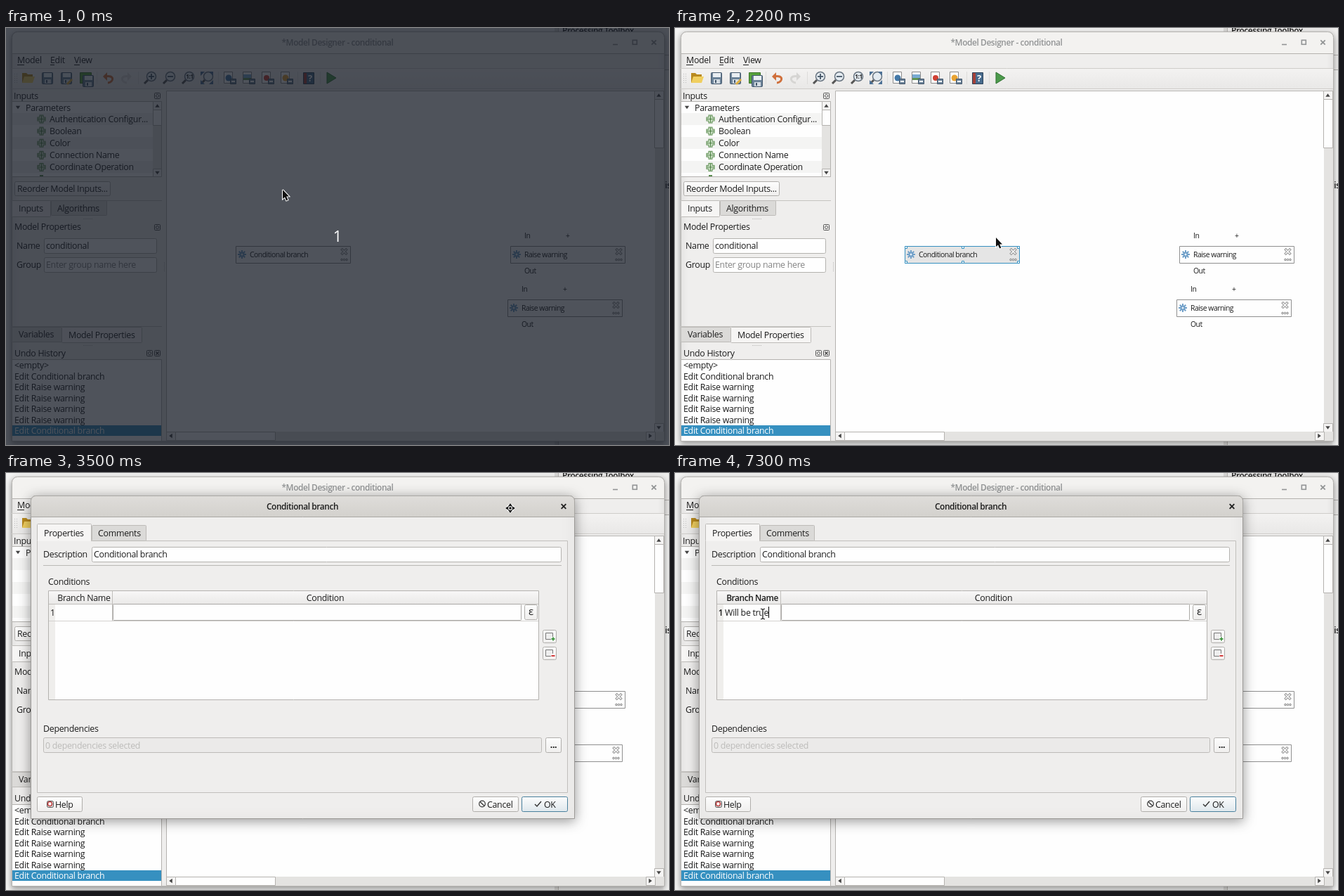
Recreate the animation shown at these times as an HTML page with a canvas. Size 944x593 px, loop 8 s.

```html
<!DOCTYPE html>
<html lang="en">
<head>
<meta charset="utf-8">
<title>Model Designer</title>
<style>
html, body { margin: 0; width: 100%; height: 100%; overflow: hidden; }
canvas { display: block; }
</style>
</head>
<body>
<canvas id="stage" width="944" height="593"></canvas>
<script>
const c = document.getElementById('stage').getContext('2d');
const LOOP = 8000, STEP = 100;
const INK = '#1c1c1c', PANEL = '#efeeed', WHITE = '#fefefe', EDGE = '#b4b2af', BLUE = '#3690c0';

// Each key is [time, x, y].
const pointerPath = [[600, 394, 230], [1300, 477, 329], [1400, 481, 330], [2100, 481, 330],
  [2600, 247, 21], [2700, 247, 21], [2900, 263, 23], [3100, 553, 42], [3300, 690, 49],
  [3500, 718, 50], [3700, 718, 50], [4400, 124, 198]];
const dialogPath = [[2700, -470, -28], [2900, -454, -27], [3100, -141, -12], [3200, -50, -5],
  [3300, -12, -1], [3500, 1, 0], [3700, 1, 0], [3800, 0, 0]];
const typing = [[5700, 'W'], [6200, 'Wi'], [6300, 'Wil'], [6400, 'Will'], [6500, 'Will b'], [6600, 'Will be'],
  [6700, 'Will be '], [7000, 'Will be t'], [7100, 'Will be tru'], [7300, 'Will be true']];

function along(path, t) {
  const i = path.findIndex(k => k[0] > t);
  if (i === 0) return path[0].slice(1);
  if (i < 0) return path[path.length - 1].slice(1);
  const [t0, x0, y0] = path[i - 1], [t1, x1, y1] = path[i];
  const u = (t - t0) / (t1 - t0), e = u * u * (3 - 2 * u);
  return [Math.round(x0 + (x1 - x0) * e), Math.round(y0 + (y1 - y0) * e)];
}

function rect(x, y, w, h, fill) { c.fillStyle = fill; c.fillRect(x, y, w, h); }

function box(x, y, w, h, fill = WHITE, stroke = EDGE, r = 0) {
  c.beginPath();
  c.roundRect(x + .5, y + .5, w, h, r);
  c.fillStyle = fill; c.fill();
  c.strokeStyle = stroke; c.lineWidth = 1; c.stroke();
}

function line(color, width, ...p) {
  c.beginPath();
  for (let i = 0; i < p.length; i += 2) c.lineTo(p[i], p[i + 1]);
  c.strokeStyle = color; c.lineWidth = width; c.stroke();
}

function poly(fill, ...p) {
  c.beginPath();
  for (let i = 0; i < p.length; i += 2) c.lineTo(p[i], p[i + 1]);
  c.fillStyle = fill; c.fill();
}

function disc(x, y, r, fill, stroke, width = 1) {
  c.beginPath(); c.arc(x, y, r, 0, 7);
  if (fill) { c.fillStyle = fill; c.fill(); }
  if (stroke) { c.strokeStyle = stroke; c.lineWidth = width; c.stroke(); }
}

function text(s, x, y, { color = INK, size = 12.4, weight = 400, align = 'left', gap = -.3 } = {}) {
  c.font = `${weight} ${size}px "Open Sans", "Noto Sans", sans-serif`;
  c.letterSpacing = gap + 'px';
  c.textAlign = align;
  c.fillStyle = color;
  c.fillText(s, x, y);
}

const bold = (s, x, y, color = INK) =>
  text(s, x, y, { color, size: 11.9, weight: 600, align: 'center', gap: -.4 });
const small = (s, x, y) => text(s, x, y, { size: 10.4, gap: -.5 });

function gradient(y, h, top, bottom) {
  const g = c.createLinearGradient(0, y, 0, y + h);
  g.addColorStop(0, top); g.addColorStop(1, bottom);
  return g;
}

const button = (x, y, w, h, stroke = '#b0aeab', bottom = '#f0efee') =>
  box(x, y, w, h, gradient(y, h, '#fdfdfd', bottom), stroke, 2);

function shadowed(draw, blur) {
  c.save();
  c.shadowColor = 'rgba(0,0,0,.4)'; c.shadowBlur = blur; c.shadowOffsetY = 3;
  draw();
  c.restore();
}

function arrowHead(x, y, dx, dy, size = 3.2, color = '#444') {
  poly(color, x + dx * size * .7, y + dy * size * .7, x - dx * size * .7 + dy * size, y - dy * size * .7 + dx * size,
    x - dx * size * .7 - dy * size, y - dy * size * .7 - dx * size);
}

function cross(x, y, r, color, width = 1.6) {
  line(color, width, x - r, y - r, x + r, y + r);
  line(color, width, x - r, y + r, x + r, y - r);
}

function grip(x, y, vertical) {
  for (let i = -3; i < 4; i++) rect(x + (vertical ? 0 : i * 2), y + (vertical ? i * 2 : 0), 1, 1, '#b9b8b6');
}

function dockIcon(x, y, close) {
  box(x - 4, y - 4, 8, 8, PANEL, '#555', 1);
  if (close) cross(x + .5, y + .5, 2.2, '#444', 1.3);
  else { disc(x + .5, y + .5, 2, null, '#555'); }
}

function plusIcon(x, y) {
  rect(x - 2.5, y - 6, 6, 12, '#5a8b4f'); rect(x - 5.5, y - 3, 12, 6, '#5a8b4f');
  rect(x - 1.5, y - 5, 4, 10, '#d5e8cf'); rect(x - 4.5, y - 2, 10, 4, '#d5e8cf');
  line('#477a3d', 1, x + .5, y - 5, x + .5, y + 5);
  line('#477a3d', 1, x - 5, y, x + 6, y);
}

function gear(x, y) {
  for (let i = 0; i < 4; i++) {
    const a = i * Math.PI / 4, dx = 6 * Math.cos(a), dy = 6 * Math.sin(a);
    line('#6f9fc8', 2, x - dx, y - dy, x + dx, y + dy);
  }
  disc(x, y, 3.6, '#6f9fc8');
  disc(x, y, 1.5, '#e8f0f8');
}

function magnifier(x, y) {
  line('#555', 3, x - 3, y + 3, x - 8, y + 8);
  disc(x + 2, y - 2, 6.5, '#e4ebf1', '#687480', 1.5);
}

function floppy(x, y) {
  box(x - 8, y - 8, 15, 16, '#6b8298', '#43566b', 1);
  rect(x - 5, y - 7, 11, 6, '#e9eef2');
  rect(x - 4, y + 2, 9, 6, '#d3dbe2');
  rect(x - 2, y + 3, 2, 4, '#43566b');
}

function exportIcon(x, y, mark) {
  box(x - 8, y - 9, 12, 16, WHITE, '#8a8a8a');
  mark(x - 1, y);
  box(x + 1, y + 1, 8, 7, '#6b8298', '#43566b');
  rect(x + 3, y + 4, 5, 2, '#fff');
}

function curl(x, y, dir, color) {
  c.beginPath();
  c.moveTo(x - 5 * dir, y - 2);
  c.bezierCurveTo(x + 9 * dir, y - 5, x + 8 * dir, y + 6, x - dir, y + 7);
  c.strokeStyle = color; c.lineWidth = 3; c.stroke();
  poly(color, x - 8 * dir, y - 2, x - 2 * dir, y - 8, x - 2 * dir, y + 4);
}

function toolbar() {
  rect(9, 58, 928, 28, gradient(58, 28, '#f3f2f1', '#e9e8e7'));
  for (let y = 65; y < 79; y += 3) { rect(12, y, 1, 1, '#bbb'); rect(15, y, 1, 1, '#bbb'); }
  for (const x of [129, 188, 302, 415, 447]) rect(x, 62, 1, 18, '#dddcda');
  poly('#b98a1f', 23, 64, 29, 64, 31, 66, 38, 66, 38, 78, 23, 78);
  poly('#f0cf60', 26, 69, 41, 69, 38, 78, 23, 78);
  floppy(59, 71); floppy(86, 71);
  line('#e0b040', 3, 94, 73, 87, 80);
  box(105, 63, 16, 15, '#57a23c', '#3d7429');
  floppy(117, 75);
  curl(146, 71, 1, '#d0703c'); curl(171, 71, -1, '#d6d5d3');
  for (const x of [205, 232, 259]) magnifier(x, 71);
  line('#456', 1.8, 203, 69, 211, 69); line('#456', 1.8, 207, 65, 207, 73);
  line('#456', 1.8, 230, 69, 238, 69);
  text('1:1', 261.5, 72, { size: 8, weight: 700, align: 'center' });
  magnifier(286, 71);
  for (const [dx, dy] of [[-1, -1], [1, -1], [1, 1], [-1, 1]])
    poly('#4d7196', 286 + dx * 9, 71 + dy * 9, 286 + dx * 3, 71 + dy * 9, 286 + dx * 9, 71 + dy * 3);
  exportIcon(318, 71, (x, y) => disc(x, y, 4.5, '#4479a8'));
  exportIcon(345, 71, (x, y) => { rect(x - 6, y - 5, 11, 8, '#78aad2'); rect(x - 6, y, 11, 3, '#5f9452'); });
  exportIcon(372, 71, (x, y) => disc(x, y, 4, '#cf4034'));
  exportIcon(399, 71, (x, y) => disc(x, y, 4.5, '#e9a332'));
  box(423, 63, 15, 16, '#486b8d', '#2c4259'); rect(424, 64, 4, 15, '#a54038');
  text('?', 433, 76, { color: '#fff', size: 13, weight: 700, align: 'center' });
  poly('#4c9a4c', 457, 63, 470, 71, 457, 79);
  line('#2f7130', 1, 457, 63, 470, 71, 457, 79, 457, 63);
}

function tab(x, y, w, h, label, active, tx, ty) {
  box(x, y, w, h, active ? '#f6f5f4' : '#dbdad8', '#bdbbb8', 1);
  text(label, tx, ty);
}

function leftPanel() {
  text('Inputs', 11, 100.5); dockIcon(215, 96);
  box(8, 104, 213, 107);
  for (const y of [121, 155, 189]) rect(9, y, 200, 17, '#f4f4f3');
  arrowHead(17, 113, 0, 1);
  text('Parameters', 28, 117.5);
  ['Authentication Configur...', 'Boolean', 'Color', 'Connection Name', 'Coordinate Operation']
    .forEach((s, i) => { plusIcon(50, 129.5 + i * 17.1); text(s, 62, 134 + i * 17.1); });
  rect(48, 209, 5, 2, '#5a8b4f');
  rect(209, 105, 12, 106, '#e4e3e1');
  box(209, 104, 12, 12, '#f5f4f3'); arrowHead(215.5, 110.5, 0, -1);
  box(209, 116, 12, 22);
  box(209, 200, 12, 11, '#f5f4f3'); arrowHead(215.5, 206, 0, 1);
  button(12, 218, 136, 20); text('Reorder Model Inputs...', 16, 232.5);

  line('#c5c3c0', 1, 8, 245.5, 222, 245.5);
  tab(64, 245, 79, 21, 'Algorithms', false, 73, 260.5);
  tab(8, 245, 55, 23, 'Inputs', true, 18, 261);
  grip(116, 271);
  text('Model Properties', 12, 287); dockIcon(215, 283);
  text('Name', 15, 314); box(54, 299, 160, 21, WHITE, EDGE, 2); text('conditional', 57, 314);
  text('Group', 15, 341); box(54, 326, 160, 21, WHITE, EDGE, 2);
  text('Enter group name here', 57, 341, { color: '#858585' });
  grip(225, 339, true);

  line('#c5c3c0', 1, 8, 424.5, 222, 424.5);
  tab(8, 425, 71, 21, 'Variables', false, 18, 440);
  tab(79, 425, 114, 22, 'Model Properties', true, 89, 440.5);
  grip(116, 451);
  text('Undo History', 12, 466.5); dockIcon(204, 462); dockIcon(215, 462, true);
  box(8, 471, 213, 116);
  rect(9, 565, 212, 15, BLUE);
  const raise = 'Edit Raise warning', branch = 'Edit Conditional branch';
  ['<empty>', branch, raise, raise, raise, raise, branch].forEach((s, i) =>
    text(s, 12, 484 + i * 15.5, { color: i === 6 ? '#fff' : INK }));
}

function node(x, y, label, hover, selected) {
  box(x, y, 163, 24, selected ? '#e5e5e5' : hover ? '#f1f0f0' : WHITE, selected ? BLUE : '#8f8f8f');
  if (hover) rect(x + 148, y + 2, 14, 21, '#d6d6d6');
  gear(x + 9, y + 12);
  small(label, x + 20, y + 15.5);
  cross(x + 154.5, y + 8, 4, '#8c8c8c', 3.6);
  cross(x + 154.5, y + 8, 3.4, '#f6f6f6', 1.6);
  for (const dx of [151, 154.5, 158]) disc(x + dx, y + 19.5, 1.3, '#eee', '#777', .9);
  if (!selected) return;
  for (const dx of [0, 81, 160]) for (const dy of [0, 21])
    box(x + dx, y + dy, 3, 3, WHITE, BLUE);
}

function warningNode(x, y) {
  small('In', x + 20, y - 11.5); small('+', x + 79, y - 11.5);
  node(x, y, 'Raise warning');
  small('Out', x + 20, y + 39);
}

function modelCanvas(t) {
  box(228, 89, 709, 498);
  const selected = t >= 2100;
  node(327, 310, 'Conditional branch', t >= 1300 && !selected, selected);
  warningNode(718, 310);
  warningNode(714, 386);
  rect(924, 90, 13, 484, '#e4e3e1');
  box(923, 89, 13, 12, '#f5f4f3'); arrowHead(929.5, 95.5, 0, -1);
  box(923, 101, 13, 69);
  box(923, 562, 13, 12, '#f5f4f3'); arrowHead(929.5, 568.5, 0, 1);
  rect(229, 574, 708, 13, '#e4e3e1');
  box(228, 574, 13, 12, '#f5f4f3'); arrowHead(234.5, 580, -1, 0);
  box(241, 574, 142, 12);
  box(911, 574, 13, 12, '#f5f4f3'); arrowHead(917.5, 580, 1, 0);
}

function backdrop() {
  rect(0, 0, 944, 593, '#f4f4f3');
  rect(781, 0, 163, 593, '#efeeed');
  rect(781, 0, 6, 593, '#dddcda'); rect(786, 0, 1, 593, '#b8b6b3');
  rect(936, 60, 8, 533, '#f7f7f6');
  line(EDGE, 1, 936, 38.5, 944, 38.5); line(EDGE, 1, 936, 59.5, 944, 59.5);
  bold('Processing Toolbox', 843, 8);
  bold('is', 942.5, 228);
}

function mainWindow(t) {
  shadowed(() => box(8, 5, 929, 582, PANEL, EDGE, [8, 8, 0, 0]), 8);
  box(8, 5, 929, 31, '#f3f2f0', EDGE, [8, 8, 0, 0]);
  bold('*Model Designer - conditional', 472, 24.5, '#929495');
  line('#929495', 1.6, 864, 23.5, 871, 23.5);
  c.strokeRect(892.3, 17.3, 6, 6);
  cross(922.5, 20.5, 3.2, '#929495', 1.8);
  [['Model', 16, 10], ['Edit', 63, 6], ['View', 97, 8]].forEach(([s, x, w]) => {
    text(s, x, 50); rect(x, 52, w, 1, INK);
  });
  line('#cfcdca', 1, 8, 57.5, 937, 57.5);
  toolbar();
  line('#cfcdca', 1, 8, 86.5, 937, 86.5);
  leftPanel();
  modelCanvas(t);
}

function rowButton(y, color, plus) {
  button(763, y, 19, 18);
  box(767, y + 4, 10, 9, '#eee', '#777');
  disc(778, y + 13, 3.2, '#fff');
  line(color, 2, 775.5, y + 13, 780.5, y + 13);
  if (plus) line(color, 2, 778, y + 10.5, 778, y + 15.5);
}

function dialog(t) {
  const editing = t >= 4900;
  shadowed(() => box(34, 32, 774, 459, PANEL, '#9c9a97', [7, 7, 0, 0]), 17);
  box(34, 32, 774, 30, gradient(32, 30, '#dfddda', '#d3d1cd'), '#a9a7a3', [7, 7, 0, 0]);
  bold('Conditional branch', 421, 51.5);
  cross(793, 47.5, 3.3, '#222', 1.9);
  box(43, 96, 755, 358, PANEL, '#c1bfbc');
  tab(121, 74, 77, 22, 'Comments', false, 130, 89.5);
  tab(43, 72, 77, 24, 'Properties', true, 53, 89.5);
  rect(44, 96, 76, 1, '#f3f2f1');
  text('Description', 52, 120);
  box(121, 105, 668, 21, WHITE, EDGE, 2); text('Conditional branch', 124, 120);
  line('#bbb9b6', 1, 52, 131.5, 790, 131.5);

  text('Conditions', 59, 158.5);
  box(59, 167, 698, 155);
  rect(60, 168, 697, 18, gradient(168, 18, '#f8f7f7', '#eae9e8'));
  line('#c1bfbc', 1, 60, 186.5, 757, 186.5);
  rect(60, 187, 9, 135, '#efeeec');
  line('#c1bfbc', 1, 150.5, 168, 150.5, 210);
  line('#d4d2d0', 1, 60, 210.5, 757, 210.5);
  if (editing) { bold('Branch Name', 110, 181.5); bold('1', 65, 203); }
  else { text('Branch Name', 110, 181.5, { align: 'center' }); text('1', 62, 203); }
  text('Condition', 453.5, 181.5, { align: 'center' });
  box(151, 186, 581, 23, WHITE, '#aaa8a5', 1);
  button(737, 187, 18, 21); text('ε', 746.5, 202, { size: 15, align: 'center' });
  rowButton(223, '#4a9a4a', true);
  rowButton(247, '#d03a3a', false);

  if (editing) {
    const typed = typing.reduce((s, [at, value]) => t >= at ? value : s, '');
    text(typed, 71, 202.5);
    const caret = 71 + Math.round(c.measureText(typed).width);
    if (t < 5400 || t >= 5700) rect(caret, 190, 1, 16, '#000');
  }

  text('Dependencies', 52, 368);
  box(52, 376, 709, 21, '#ebeae9', '#bdbbb8', 2);
  text('0 dependencies selected', 55, 391.5, { color: '#bcbbb9' });
  button(767, 376, 22, 21); text('...', 778.5, 391, { align: 'center', weight: 700 });

  button(43, 460, 64, 21); text('Help', 69, 475.5);
  box(57, 466, 9, 9, '#ddd', '#555', 2); disc(61.5, 470.5, 3, '#fff', '#b44', 1.6);
  button(663, 460, 65, 21); text('Cancel', 684, 475.5);
  disc(677, 470.5, 4.3, null, '#333', 1.2); line('#333', 1.2, 674, 467.5, 680, 473.5);
  button(733, 460, 65, 21, '#49809d', '#dfe8ed'); text('OK', 765, 475.5);
  line('#333', 1.4, 752, 471, 755, 474, 761, 467);
}

function pointer(t) {
  const [x, y] = along(pointerPath, t);
  c.save();
  c.translate(x, y);
  if (t >= 4900) {
    c.translate(125 - x, 200 - y);
    for (const [color, width] of [['#fff', 3], ['#222', 1.3]]) {
      line(color, width, 0, -6, 0, 7);
      line(color, width, -3, -7, 0, -6, 3, -7);
      line(color, width, -3, 8, 0, 7, 3, 8);
    }
  } else if (t >= 2800 && t < 3800) {
    disc(0, 0, 5.5, '#fff');
    for (const [dx, dy] of [[1, 0], [-1, 0], [0, 1], [0, -1]]) {
      arrowHead(dx * 5, dy * 5, dx, dy, 4.2, '#fff');
      arrowHead(dx * 5, dy * 5, dx, dy, 2.8, '#111');
    }
    disc(0, 0, 3.5, null, '#222', 1);
    disc(0, 0, 1.8, '#111');
  } else {
    const shape = [0, 0, 0, 13, 3, 10.4, 5.2, 15.5, 7.4, 14.5, 5.2, 9.6, 9, 9.4, 0, 0];
    line('#fff', 2, ...shape);
    poly('#111', ...shape);
  }
  c.restore();
}

function draw(t) {
  backdrop();
  mainWindow(t);
  if (t >= 2300) {
    const [x, y] = along(dialogPath, t);
    c.save();
    c.translate(x, y);
    if (t < 2400) {
      c.globalAlpha = .6;
      c.translate(421, 262); c.scale(.93, .93); c.translate(-421, -262);
    }
    dialog(t);
    c.restore();
  }
  const shade = Math.max(0, Math.min(1, (700 - t) / 300));
  if (shade) {
    c.globalAlpha = shade;
    rect(0, 0, 944, 593, 'rgba(20,26,36,.75)');
    text('1', 472, 304, { color: '#fff', size: 22, align: 'center' });
    c.globalAlpha = 1;
  }
  pointer(t);
}

function tick(now) {
  draw(Math.floor(now % LOOP / STEP) * STEP);
  requestAnimationFrame(tick);
}
requestAnimationFrame(tick);
</script>
</body>
</html>
```
